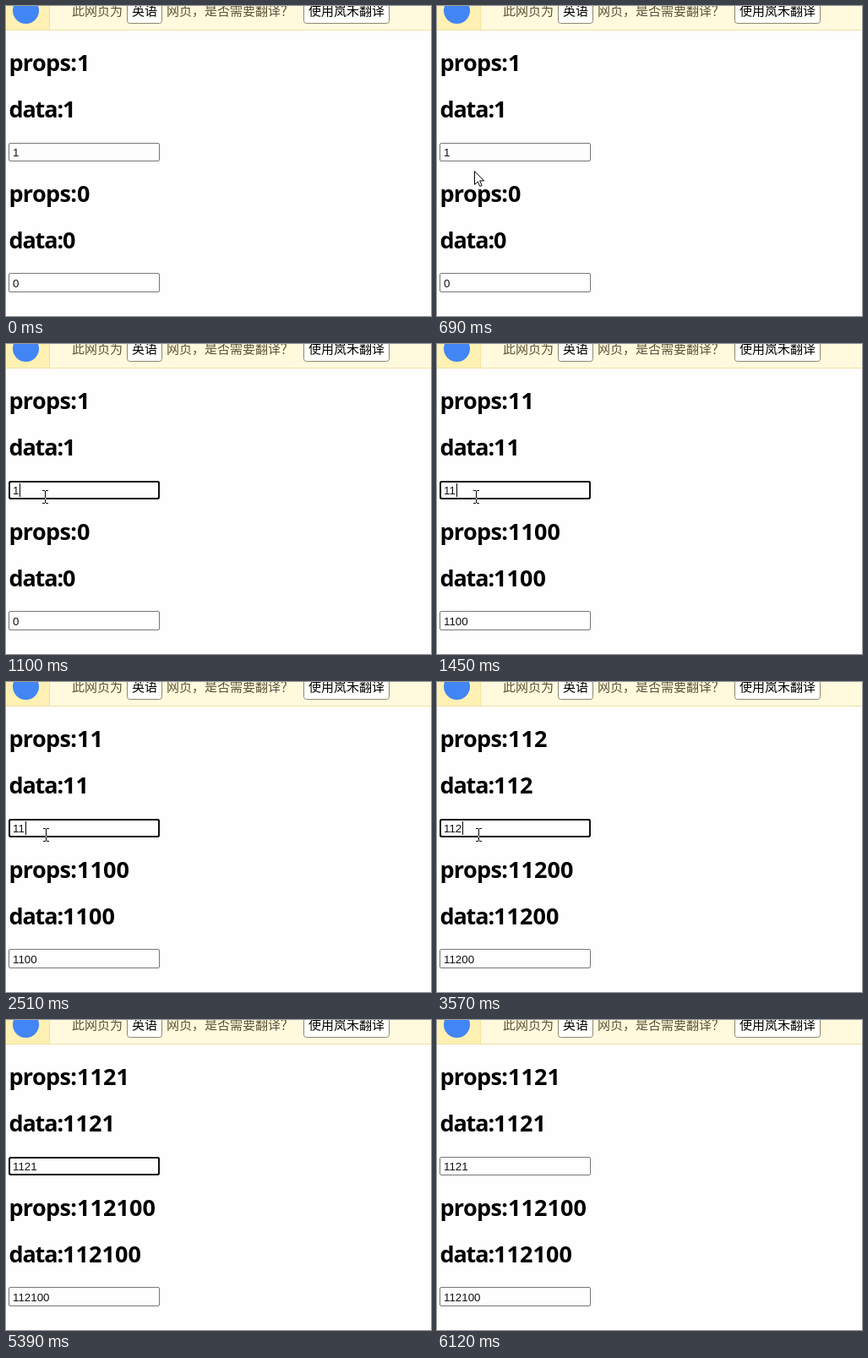
Write an HTML page that moves like this. It is 503 px wide and 367 px high and loops after 6.25 s.

```html
<!DOCTYPE html>
<html lang="zh-CN">
<head>
<meta charset="utf-8">
<title>props and data</title>
<style>
  html, body { margin: 0; width: 100%; height: 100%; overflow: hidden; background: #fefefe; }
  svg { display: block; width: 100%; height: 100%; }
  .bar { font: 15px "Noto Sans CJK SC", "Noto Sans CJK", sans-serif; fill: #5c5233; }
  .bar .label { fill: #000; }
  .bar rect { fill: #fffffb; stroke: #8c8872; }
  .head { font: bold 27px "Open Sans", "Noto Sans", sans-serif; }
  .field { font: 13.333px "Liberation Sans", Arial, sans-serif; fill: #111; }
  .box { fill: #fefefe; stroke: #767676; }
  #beam { fill: #fff; mix-blend-mode: difference; }
</style>
</head>
<body>
<svg viewBox="0 0 503 367">
  <rect width="503" height="367" fill="#fefefe"/>
  <rect width="503" height="28" fill="#fffade"/>
  <rect width="52" height="28" fill="#fff0b4"/>
  <rect x="51" width="1" height="28" fill="#f3e3a2"/>
  <rect y="28" width="503" height="1" fill="#efe0a4"/>
  <circle cx="23.5" cy="5.5" r="15.5" fill="#4285f4"/>
  <g class="bar">
    <rect x="143.5" y="-8.5" width="41" height="29" rx="3"/>
    <rect x="352.5" y="-8.5" width="101" height="29" rx="3"/>
    <text x="78" y="11">此网页为</text>
    <text class="label" x="149" y="11">英语</text>
    <text x="190" y="11">网页，是否需要翻译？</text>
    <text class="label" x="358" y="11">使用岚禾翻译</text>
  </g>
  <g id="page"></g>
  <rect id="ring" x="4" y="163" width="177" height="20" rx="2" fill="none" stroke="#101010" stroke-width="2"/>
  <rect id="caret" y="165" width="1" height="16"/>
  <path id="arrow" d="M.5 .7V16.4L4.2 12.9L6.8 18.5L9.2 17.5L6.7 11.9H11.6Z" fill="#fff" stroke="#000"/>
  <path id="beam" d="M-3 -8h3v1h1v-1h3v1h-3v14h3v1h-3v-1h-1v1h-3v-1h3v-14h-3z" shape-rendering="crispEdges"/>
</svg>
<script>
const LOOP = 6250, TICK = 70;
const $ = id => document.getElementById(id);
const page = $('page'), ring = $('ring'), caret = $('caret'), arrow = $('arrow'), beam = $('beam');

function add(tag, attrs, text = '') {
  const el = document.createElementNS('http://www.w3.org/2000/svg', tag);
  for (const k in attrs) el.setAttribute(k, attrs[k]);
  el.textContent = text;
  page.append(el);
  return el;
}

function heading(label, x, y, spacing) {
  add('text', { class: 'head', x: 3.4, y, 'letter-spacing': spacing }, label);
  return add('text', { class: 'head', x, y, 'letter-spacing': 0.13 });
}

// Two headings and an input that show the same value
function counter(y, boxY, boxHeight) {
  const parts = [heading('props:', 83.9, y, -0.65), heading('data:', 66.9, y + 55, -1.1)];
  add('rect', { class: 'box', x: 3.5, y: boxY, width: 178, height: boxHeight, rx: 1.5 });
  parts.push(add('text', { class: 'field', x: 8, y: y + 101 }));
  return value => parts.forEach(p => { if (p.textContent !== value) p.textContent = value; });
}

const first = counter(77, 162.5, 21), second = counter(232, 316.5, 22);

// Value of the last step that has begun
const at = (steps, t) => steps.reduce((v, [start, next]) => t >= start ? next : v, steps[0][1]);

const typed = [[0, '1'], [1450, '11'], [3570, '112'], [4650, '1121']];
const caretOn = [[0, false], [1100, true], [1960, false], [2510, true], [3040, false],
  [3570, true], [4120, false], [4650, true], [5180, false], [5720, true], [6120, false]];
const caretX = [0, 16, 23, 30, 38];
const pointer = [[0, null], [760, ['arrow', 43, 195]], [830, ['arrow', 44, 188]],
  [900, ['beam', 46, 183]], [970, ['beam', 46, 181]], [1700, ['beam', 47, 181]],
  [2640, ['beam', 49, 181]], [5250, ['arrow', 110, 212]], [5320, ['arrow', 255, 288]], [5390, null]];

// The pointer glides in, slowing down, then follows the listed steps
function pointerAt(t) {
  if (t < 200 || t >= 760) return at(pointer, t);
  const p = Math.floor((t - 200) / TICK) / 7;
  const left = (1 - p) ** 2;
  return ['arrow', Math.round(44 + 308 * left), Math.round(195 + 160 * left)];
}

const show = (el, on) => el.setAttribute('visibility', on ? 'visible' : 'hidden');

function draw(t) {
  const value = at(typed, t);
  first(value);
  second(value === '1' ? '0' : value + '00');
  show(ring, t >= 1100 && t < 6120);
  show(caret, at(caretOn, t));
  caret.setAttribute('x', caretX[value.length]);

  const [kind, x, y] = pointerAt(t) || [];
  show(arrow, kind === 'arrow');
  show(beam, kind === 'beam');
  if (kind) $(kind).setAttribute('transform', `translate(${x} ${y})`);
}

const begin = performance.now();
function frame() {
  draw((performance.now() - begin) % LOOP);
  requestAnimationFrame(frame);
}
frame();
</script>
</body>
</html>
```
